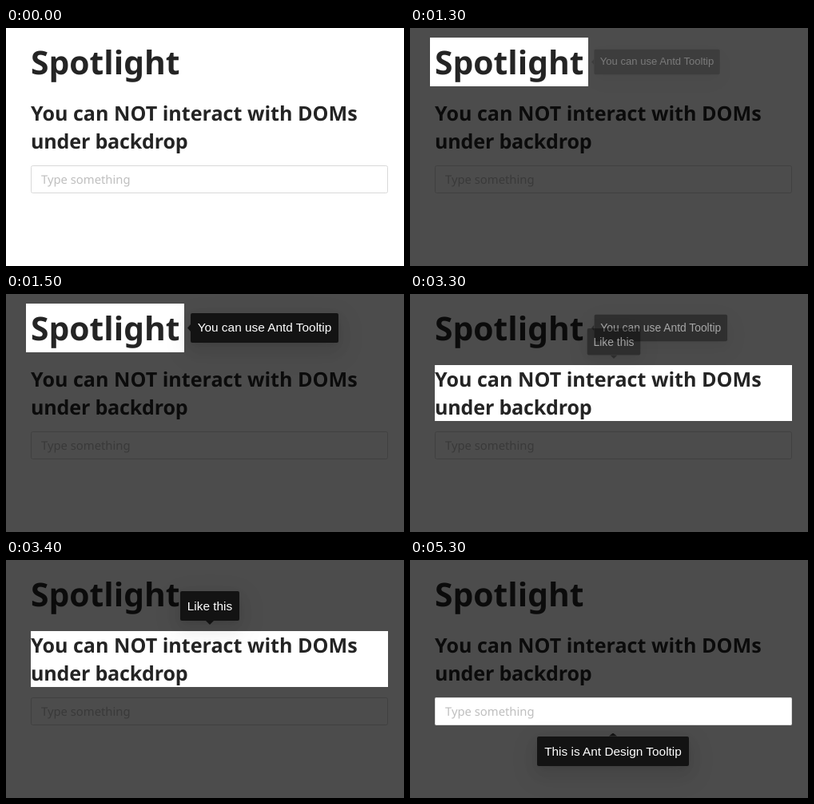
An HTML page that plays this animation: 498 px wide and 298 px high, repeating every 6900 ms.

```html
<!DOCTYPE html>
<html lang="en">
<head>
<meta charset="utf-8">
<title>Spotlight</title>
<style>
  html, body { margin: 0; width: 100%; height: 100%; overflow: hidden; background: #fff; }
  #stage { position: relative; width: 498px; height: 298px; overflow: hidden; }
  #stage > * { position: absolute; }
  svg { left: 0; top: 0; font-family: "Noto Sans", sans-serif; fill: #242424; }
  .heading { font-weight: 700; }
  .placeholder { font-size: 14.8px; fill: #bfbfbf; }
  #spot { box-shadow: 0 0 0 600px rgba(0, 0, 0, .7); }
  .tip {
    height: 37px; border-radius: 2px; background: rgba(0, 0, 0, .75); color: #fff;
    font: 15.4px/37px "Liberation Sans", Arial, sans-serif;
    text-align: center; white-space: nowrap;
    box-shadow: 0 3px 7px -4px rgba(0, 0, 0, .12), 0 7px 18px rgba(0, 0, 0, .08),
      0 10px 31px 9px rgba(0, 0, 0, .05);
  }
  .tip::before { content: ""; position: absolute; background: rgba(0, 0, 0, .75); }
  .right { transform-origin: -4px 50%; line-height: 35px; }
  .right::before { left: -4px; top: 14px; width: 4px; height: 9px; clip-path: polygon(100% 0, 0 50%, 100% 100%); }
  .above { transform-origin: 50% 41px; }
  .above::before { left: calc(50% - 5px); top: 100%; width: 10px; height: 5px; clip-path: polygon(0 0, 100% 0, 50% 100%); }
  .below { transform-origin: 50% -4px; }
  .below::before { left: calc(50% - 5px); bottom: 100%; width: 10px; height: 4px; clip-path: polygon(0 100%, 50% 0, 100% 100%); }
</style>
</head>
<body>
<div id="stage">
  <svg width="498" height="298" text-rendering="geometricPrecision">
    <text class="heading" x="31" y="58" font-size="40.8">Spotlight</text>
    <text class="heading" font-size="25.1">
      <tspan x="31" y="116">You can NOT interact with DOMs</tspan>
      <tspan x="31" y="151" letter-spacing="-.2">under backdrop</tspan>
    </text>
    <rect x="31.5" y="172.5" width="446" height="34" rx="2" fill="#fff" stroke="#d9d9d9"/>
    <text class="placeholder" x="44" y="195">Type something</text>
  </svg>
  <div id="spot"></div>
</div>
<script>
const LOOP = 6900, STEP = 100;
const stage = document.getElementById('stage');
const spot = document.getElementById('spot');

// Highlighted areas: start time, then x, y, width, height, corner radius
const areas = [
  { start: 1200, box: [25, 12, 198, 61, 0] },
  { start: 3200, box: [31, 89, 447, 70, 0] },
  { start: 5200, box: [31, 172, 447, 35, 2] },
];

const tips = [
  { text: 'You can use Antd Tooltip', side: 'right', x: 231, y: 24, width: 185, enter: 1250, fade: 200, exit: 3250 },
  { text: 'Like this', side: 'above', x: 218, y: 39, width: 74, enter: 3250, fade: 100, exit: 5190 },
  { text: 'This is Ant Design Tooltip', side: 'below', x: 159, y: 220.5, width: 190, enter: 5190, fade: 100, exit: LOOP },
];

function place(element, x, y, width, height) {
  Object.assign(element.style, { left: x + 'px', top: y + 'px', width: width + 'px', height: height + 'px' });
}

for (const tip of tips) {
  tip.element = document.createElement('div');
  tip.element.className = 'tip ' + tip.side;
  tip.element.textContent = tip.text;
  place(tip.element, tip.x, tip.y, tip.width, 37);
  stage.append(tip.element);
}

const progress = (time, start, duration) => Math.min(1, Math.max(0, (time - start) / duration));

function draw(time) {
  const area = areas.findLast(({ start }) => time >= start);
  spot.style.display = area ? 'block' : 'none';
  if (area) {
    place(spot, ...area.box.slice(0, 4));
    spot.style.borderRadius = area.box[4] + 'px';
  }
  for (const { element, enter, fade, exit } of tips) {
    const shown = progress(time, enter, fade) * (1 - progress(time, exit, 100));
    element.style.opacity = shown;
    element.style.transform = shown < 1 ? `scale(${0.8 + 0.2 * shown})` : 'none';
  }
}

let origin;
function tick(now) {
  origin ??= now;
  const time = (now - origin) % LOOP;
  draw(Math.floor(time / STEP) * STEP);
  requestAnimationFrame(tick);
}
draw(0);
requestAnimationFrame(tick);
</script>
</body>
</html>
```
